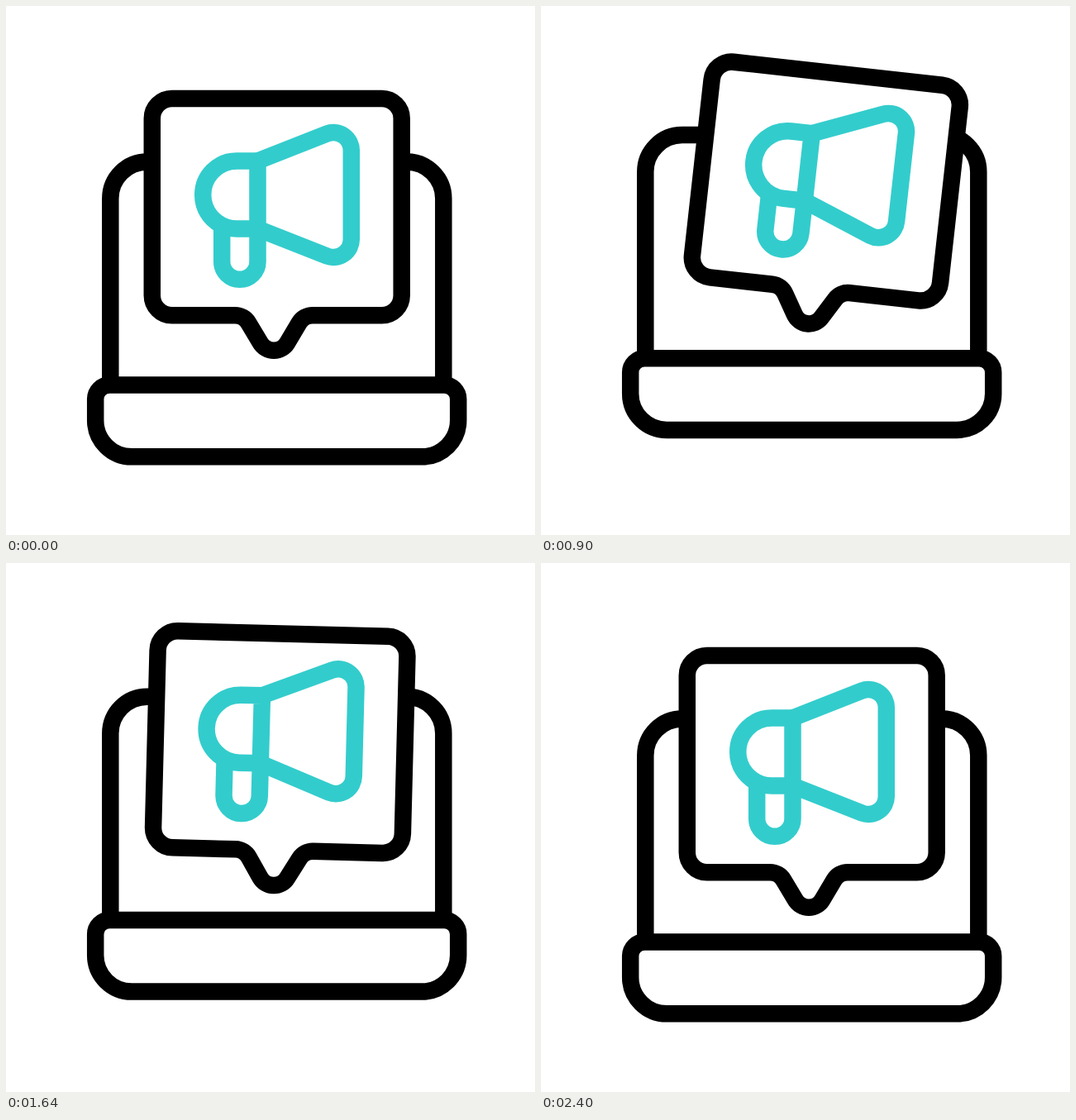
These frames come from a looping animation (640x640 px, 2420 ms). An HTML page:

```html
<!DOCTYPE html>
<html lang="en">
<head>
<meta charset="utf-8">
<title>Announcement</title>
<style>
  html, body { margin: 0; height: 100%; overflow: hidden; background: #fff; }
  svg { display: block; width: 100%; height: 100%; }
  path, line { fill: none; stroke-width: 20.5; stroke-linejoin: round; }
  .ink { stroke: #000; }
  .accent { stroke: #3cc; }
  .filled { fill: #fff; }
  line { stroke-linecap: round; }
</style>
</head>
<body>
<svg viewBox="0 0 640 640">
  <g id="scene">
    <path class="ink" d="M126.3 458V233a44.5 44.5 0 0 1 44.5-44.5H484.8a44.5 44.5 0 0 1 44.5 44.5V458"/>
    <path class="ink filled" d="M125.2 458.6H530.2a17 17 0 0 1 17 17V501.3a44 44 0 0 1-44 44H152.2a44 44 0 0 1-44-44V475.6a17 17 0 0 1 17-17z"/>
    <g id="bubble">
      <path class="ink filled" d="M200.8 112H454.7a24 24 0 0 1 24 24V350.2a24 24 0 0 1-24 24H371a19 19 0 0 0-16.5 9.5L340.5 407.2a19 19 0 0 1-33 0L293.5 383.7a19 19 0 0 0-16.5-9.5H200.8a24 24 0 0 1-24-24V136a24 24 0 0 1 24-24z"/>
      <path class="accent" d="M304.5 187.5H279.2a41 41 0 0 0 0 82H304.5z"/>
      <path class="accent" d="M304.5 187.5L388.3 154.5a21.7 21.7 0 0 1 29.5 20.3V282.2a21.7 21.7 0 0 1-29.5 20.3L304.5 269.5"/>
      <path class="accent" d="M261.2 265V309.2a21.65 21.65 0 0 0 43.3 0V265"/>
      <g id="rays"></g>
    </g>
  </g>
</svg>
<script>
const LOOP = 2420, STEP = 20, RISE = 38.4, PIVOT = "324 398";
const lift = [[0, 0], [1200, -RISE], [2400, 0]];
const tilt = [[200, 0], [600, -8], [1000, 9], [1400, -5], [1800, 5], [2200, 0]];
const rays = [[442.5, 187.7, 495.5, 162.5], [444, 226, 515.7, 223], [445.5, 255.5, 500.5, 280.5]];
const bursts = [320, 1120], DRAW = 280, LAG = 80;

const byId = id => document.getElementById(id);
const scene = byId("scene"), bubble = byId("bubble"), rayGroup = byId("rays");
const rayLines = rays.map(() => {
  const line = document.createElementNS("http://www.w3.org/2000/svg", "line");
  line.setAttribute("class", "accent");
  return rayGroup.appendChild(line);
});

const mix = (a, b, k) => a + (b - a) * k;
const ease = x => { x = Math.min(1, Math.max(0, x)); return x * x * (3 - 2 * x); };

function valueAt(keys, t) {
  let value = keys[0][1];
  for (let i = 1; i < keys.length; i++) {
    const [t0, v0] = keys[i - 1], [t1, v1] = keys[i];
    if (t > t0) value = mix(v0, v1, ease((t - t0) / (t1 - t0)));
  }
  return value;
}

function draw(t) {
  scene.setAttribute("transform", `translate(0 ${valueAt(lift, t)})`);
  bubble.setAttribute("transform", `rotate(${valueAt(tilt, t)} ${PIVOT})`);

  const start = bursts.find(b => t > b && t < b + LAG + DRAW);
  rayGroup.style.display = start === undefined ? "none" : "";
  if (start === undefined) return;
  const head = ease((t - start) / DRAW), tail = ease((t - start - LAG) / DRAW);
  rays.forEach(([x1, y1, x2, y2], i) => {
    const ends = { x1: mix(x1, x2, tail), y1: mix(y1, y2, tail), x2: mix(x1, x2, head), y2: mix(y1, y2, head) };
    for (const name in ends) rayLines[i].setAttribute(name, ends[name]);
  });
}

function tick() {
  const t = performance.now() % LOOP;
  draw(Math.floor(t / STEP) * STEP);
  requestAnimationFrame(tick);
}
tick();
</script>
</body>
</html>
```
